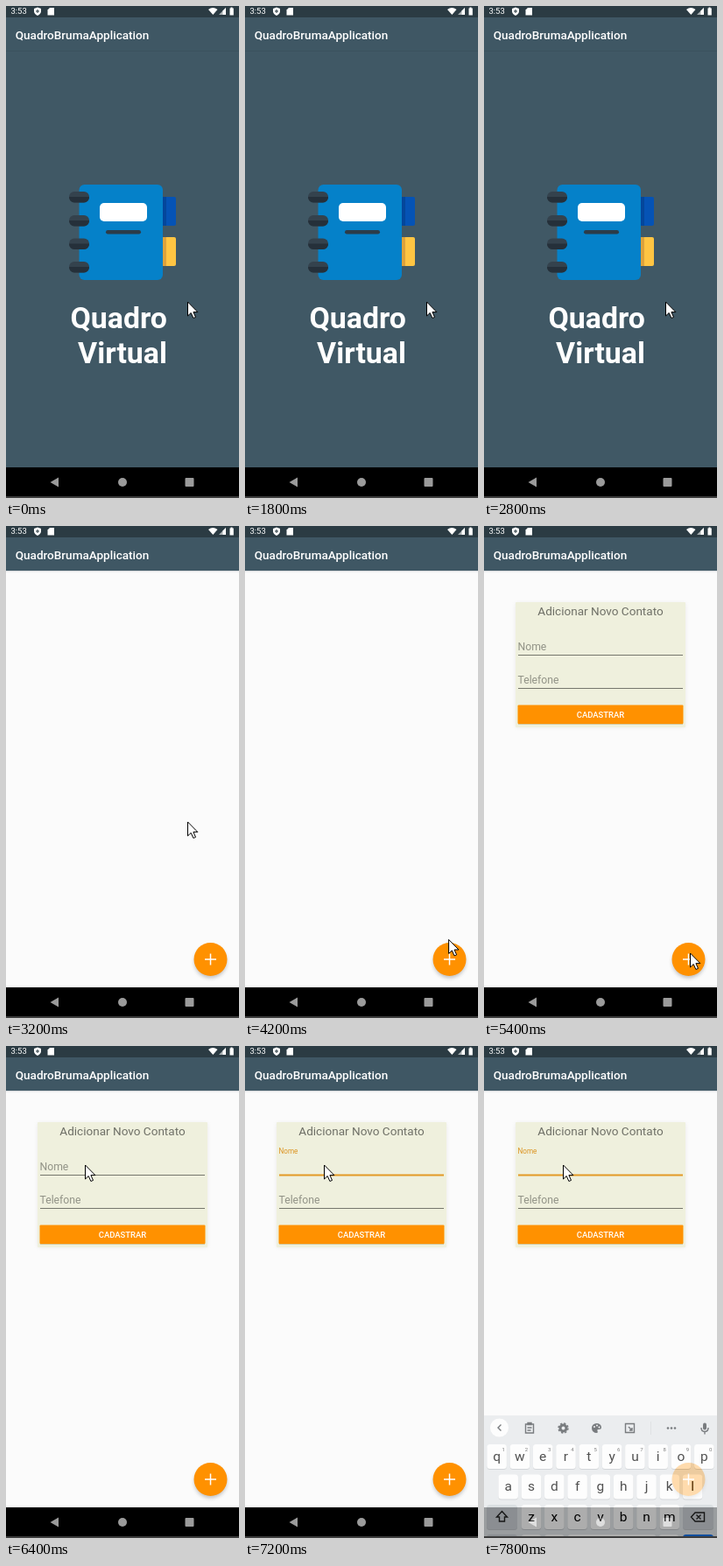
Animation, 266 px wide and 562 px high, one loop 8000 ms. Source, as an HTML page:

```html
<!DOCTYPE html>
<html lang="pt">
<head>
<meta charset="utf-8">
<title>Quadro Virtual</title>
<style>
  html, body { margin: 0; height: 100%; overflow: hidden; background: #000; }
  svg { display: block; width: 100vw; height: 100vh; }
  text { font-family: Roboto, "Noto Sans", sans-serif; white-space: pre; }
  .mid { text-anchor: middle; }
  .medium { font-weight: 500; }
  .icon { fill: none; stroke: #3c4146; stroke-width: 1.4; }
  .solid { fill: #3c4146; }
</style>
</head>
<body>
<svg viewBox="0 0 266 562">
  <defs>
    <filter id="soft" x="-50%" y="-50%" width="200%" height="200%"><feGaussianBlur stdDeviation="2"/></filter>
    <linearGradient id="drop" x2="0" y2="1">
      <stop stop-color="#d3d6d8"/><stop offset="1" stop-color="#fbfbfb"/>
    </linearGradient>
    <g id="ring">
      <rect x="72" y="-6" width="23" height="12.5" rx="6" fill="#34424d"/>
      <path d="M72 0H95A6 6.3 0 0 1 89 6.5H78A6 6.3 0 0 1 72 0" fill="#25303a"/>
    </g>
  </defs>

  <rect width="266" height="562" fill="#fbfbfb"/>

  <g id="splash">
    <rect width="266" height="530" fill="#405865"/>
    <rect y="51" width="266" height="1" fill="#3b525e"/>
    <path d="M178 218h14q2 0 2 2v29q0 2-2 2h-14z" fill="#0553b5"/>
    <path d="M178 218h5v33h-5z" fill="#04469b"/>
    <path d="M178 264h14q2 0 2 2v29q0 2-2 2h-14z" fill="#ffc543"/>
    <path d="M178 264h5v33h-5z" fill="#dda23c"/>
    <rect x="83.500" y="204" width="95.500" height="109" rx="6" fill="#0581c9"/>
    <rect x="107" y="225" width="54" height="21" rx="5" fill="#fff"/>
    <rect x="114" y="256" width="40" height="4.500" rx="2.200" fill="#2c3c49"/>
    <use href="#ring" y="218"/><use href="#ring" y="245"/>
    <use href="#ring" y="271.500"/><use href="#ring" y="298"/>
    <g class="mid" font-size="33.87" font-weight="700" fill="#fff">
      <text x="128.700" y="368">Quadro</text>
      <text x="133" y="408">Virtual</text>
    </g>
  </g>

  <g id="list">
    <rect y="51" width="266" height="2" fill="url(#drop)"/>
    <g id="card">
      <rect x="36" y="88" width="194" height="142" fill="#aaa" opacity=".2" filter="url(#soft)"/>
      <rect x="36" y="87" width="194" height="143" rx="1" fill="#eff0dd"/>
      <text class="mid" x="133" y="102" font-size="13.55" fill="#6f7067">Adicionar Novo Contato</text>
      <text id="hint" x="38.500">Nome</text>
      <rect id="line" x="39" width="188"/>
      <text x="38.500" y="180" font-size="12.19" fill="#929387">Telefone</text>
      <rect x="39" y="185" width="188" height="1" fill="#75766c"/>
      <rect x="39" y="206" width="188" height="21" fill="#d2cda9"/>
      <rect x="38.500" y="204.500" width="189" height="21.500" rx="1" fill="#ff9100"/>
      <text class="mid medium" x="133" y="219" font-size="9.48" fill="#fff">CADASTRAR</text>
    </g>
    <circle id="shade" cx="233.500" cy="498" r="18.500" filter="url(#soft)"/>
    <circle id="fab" cx="233.500" cy="495" r="19"/>
    <path d="M227 495h13M233.500 488.500v13" stroke="#fff" stroke-width="1.500"/>
  </g>

  <rect width="266" height="51" fill="#3f5764"/>
  <rect width="266" height="13" fill="#2b3b43"/>
  <text class="medium" x="10.700" y="38" font-size="13.55" fill="#fff">QuadroBrumaApplication</text>
  <g fill="#fff">
    <text x="5.500" y="9.300" font-size="9.48">3:53</text>
    <path d="M36 1.500l4 1.500v3q0 3-4 5q-4-2-4-5v-3z"/>
    <path d="M50 2h5v8.500h-7.500v-6z"/>
    <path d="M231 4q5-4 10.500 0l-5.200 6z"/>
    <path d="M251 2v8h-8z" opacity=".6"/><path d="M251 2v8h-3.500v-4.500z"/>
    <path d="M255.500 2.500h1v-1h2v1h1.300v8h-4.300z"/>
  </g>
  <path d="M36 4v4M34 6h4" stroke="#2b3b43"/>

  <rect y="527" width="266" height="35" fill="#000"/>
  <g fill="#9b9b9b">
    <path d="M50.500 544l9.500-5.500v11z"/><circle cx="133" cy="544" r="5"/>
    <rect x="204.500" y="539" width="10" height="10" rx="1"/>
  </g>

  <g id="keyboard" opacity=".68">
    <rect y="422" width="266" height="140" fill="#e4e7ea"/>
    <circle cx="17.500" cy="436" r="10.500" fill="#fff"/>
    <g class="icon">
      <path d="M19.500 432.500l-3.500 3.500 3.500 3.500"/>
      <path d="M47.500 432h9v10h-9zM50 430.500h4v2h-4zM49.500 436h5M49.500 439h4"/>
      <circle cx="90.500" cy="436.500" r="3.500" stroke-width="3"/>
      <circle cx="90.500" cy="436.500" r="5.500" stroke-dasharray="2.300 2.020"/>
      <path d="M161.500 431.500h10v10h-10zM165 435l4 4M169 436v3h-3"/>
      <path d="M248 436q0 4.500 4 4.500t4-4.500M252 440.500v3"/>
    </g>
    <g class="solid">
      <path d="M128.500 431a5.500 5.500 0 1 0 0 11q2 0 1-2.200t1.500-1.800q3 0 3-2.500a5.500 4.500 0 0 0-5.500-4.500"/>
      <circle cx="210" cy="436.500" r="1.300"/><circle cx="214" cy="436.500" r="1.300"/><circle cx="218" cy="436.500" r="1.300"/>
      <rect x="250" y="430.500" width="4" height="8" rx="2"/>
    </g>
    <g fill="#fff"><circle cx="126" cy="435" r=".9"/><circle cx="129" cy="433.500" r=".9"/><circle cx="131.500" cy="435.500" r=".9"/></g>
    <path d="M190.500 429v15" stroke="#d2d5d8"/>
    <g id="keys"></g>
    <g fill="none" stroke="#222" stroke-width="1.400">
      <path d="M20.500 531.500l6 6.500h-3v5h-6v-5h-3z"/>
      <path d="M241 533h10.500v10h-10.500l-4.500-5zM242.500 535.500l5 5M247.500 535.500l-5 5"/>
    </g>
  </g>
  <rect y="560" width="266" height="2" fill="#3d3d3d"/>

  <path id="cursor" d="M0 0V16l3.700-3.500 2.700 6 2.600-1.100-2.600-5.800h5z" fill="#fff" stroke="#000"/>
</svg>
<script>
const LOOP = 8000, STEP = 200;
const $ = id => document.getElementById(id);
const set = (id, attrs) => {
  for (const name in attrs) $(id).setAttribute(name, attrs[name]);
};
const show = (id, on) => set(id, { display: on ? 'inline' : 'none' });
const mix = (a, b, p) => a + (b - a) * p;
const ease = (t, from, to) => {
  const p = Math.min(1, Math.max(0, (t - from) / (to - from)));
  return p * p * (3 - 2 * p);
};

function key(x, y, w, label = '', fill = '#fff') {
  const box = h => `x="${x - w / 2}" width="${w}" height="28" rx="3.5" y="${y + h}"`;
  return `<rect ${box(1)} fill="#c3c7cb"/><rect ${box(0)} fill="${fill}"/>
    <text class="mid" x="${x}" y="${y + 18.5}" font-size="15.5">${label}</text>`;
}

function buildKeys() {
  const pitch = 26.3, grey = '#cdd2d7';
  let out = '';
  ['qwertyuiop', 'asdfghjkl', 'zxcvbnm'].forEach((row, r) => {
    [...row].forEach((letter, i) => {
      const x = [14.6, 27.7, 54][r] + i * pitch, y = 455 + r * 34.5;
      out += key(x, y, 22.5, letter);
      if (!r) out += `<text class="mid" x="${x + 7.5}" y="462.5" font-size="6" fill="#444">${(i + 1) % 10}</text>`;
    });
  });
  out += key(20.5, 524, 35, '', grey) + key(244.5, 524, 35, '', grey);
  out += key(20.5, 558, 35, '', grey) + key(54, 558, 22.5) + key(80.3, 558, 22.5);
  out += key(146, 558, 101) + key(211, 558, 22.5) + key(244.5, 558, 35, '', '#1a73e8');
  $('keys').innerHTML = out;
}

function draw(time) {
  const t = Math.floor(time % LOOP / STEP) * STEP;
  const pressed = t >= 4600 && t < 5200;
  const focused = t >= 6800;
  const lift = ease(t, 6600, 7000);

  show('splash', t < 3200);
  show('list', t >= 3200);
  show('card', t >= 5200);
  show('keyboard', t >= 7800);

  set('fab', { fill: pressed ? '#c66f00' : '#ff9100' });
  set('shade', { fill: '#555', opacity: pressed ? .5 : .35, cy: pressed ? 500 : 498 });

  set('hint', {
    y: mix(142, 123, lift),
    'font-size': mix(12.19, 8.13, lift),
    fill: focused ? '#dc9422' : '#929387'
  });
  set('line', {
    y: focused ? 146.5 : 147,
    height: focused ? 2 : 1,
    fill: focused ? '#e39a25' : '#75766c'
  });

  const toFab = ease(t, 3400, 4400), toField = ease(t, 5400, 6400);
  const x = mix(mix(207.5, 235.5, toFab), 90.5, toField);
  const y = mix(mix(338, 488, toFab), 136, toField);
  set('cursor', { transform: `translate(${x} ${y})` });
}

buildKeys();
const start = performance.now();
function tick() {
  draw(performance.now() - start);
  requestAnimationFrame(tick);
}
tick();
</script>
</body>
</html>
```
